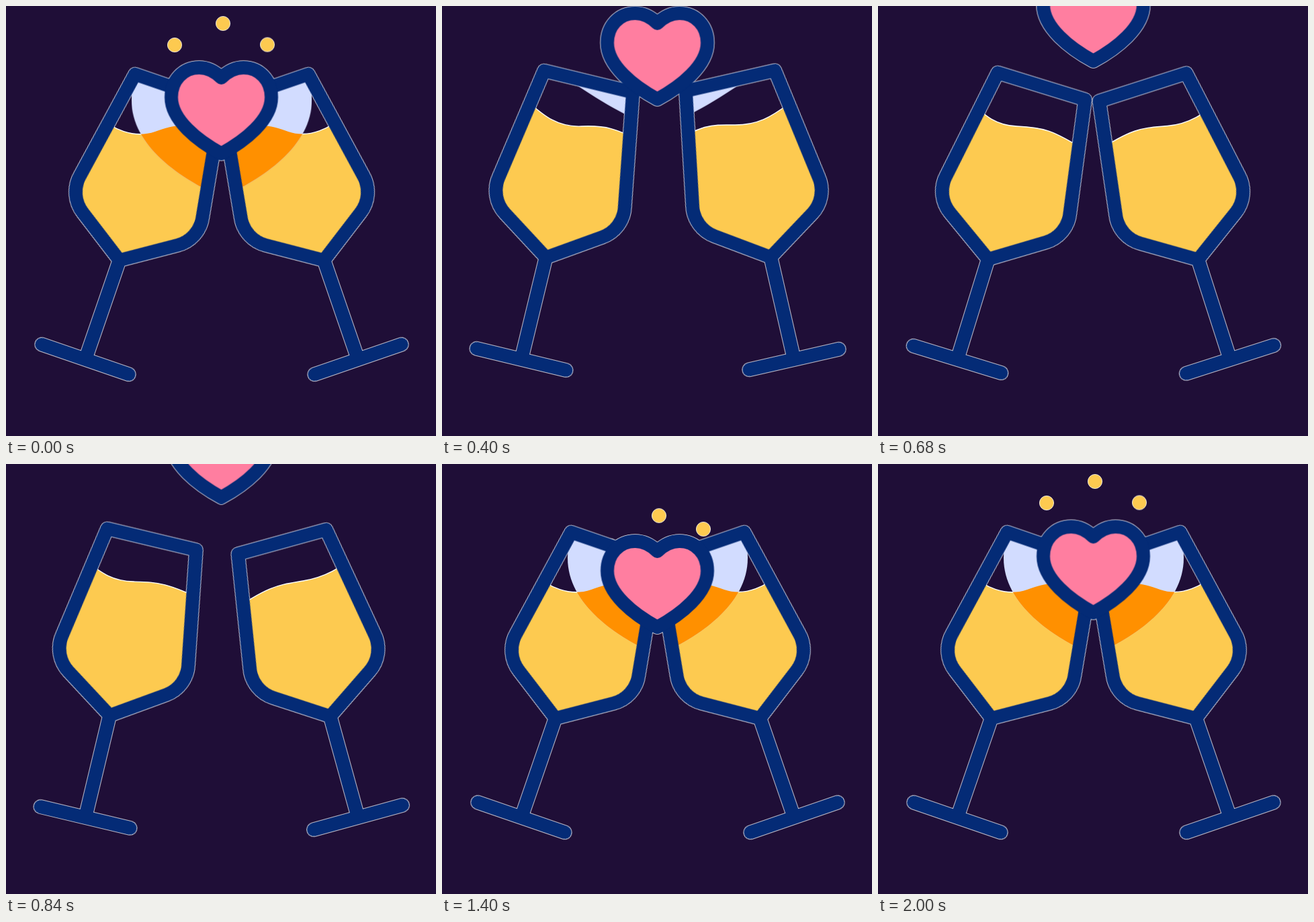
These frames come from a looping animation (640 px wide and 640 px high, 2.04 s). An HTML page without scripts:

```html
<!DOCTYPE html>
<html lang="en">
<head>
<meta charset="utf-8">
<title>Cheers</title>
<style>
  html, body { margin: 0; width: 100%; height: 100%; overflow: hidden; background: #1f0e37; }
  svg { display: block; width: 100%; height: 100%; }

  .tilt-l, .tilt-r, .wine-l, .wine-r, .splash, .rise, .grow, .dot {
    animation: 2040ms linear infinite;
  }
  .line { fill: none; stroke: #042b76; stroke-width: 20; stroke-linecap: round; stroke-linejoin: round; }
  .halo { fill: none; stroke: #fff; stroke-opacity: .9; stroke-width: 21.5; stroke-linecap: round; stroke-linejoin: round; }
  .wine { fill: #fdca50; stroke: #fff; stroke-width: 1.4; }
  .foam { fill: #d2dcff; }
  .glow { fill: #ff9000; }
  .heart { fill: #ff7ea0; stroke: #042b76; stroke-width: 20; stroke-linejoin: round; }

  /* glasses swing about the centre of the foot */
  .tilt-l { animation-name: tilt-l; }
  .tilt-r { animation-name: tilt-r; }
  @keyframes tilt-l {
    0%, 29.412%, 50.98%, 100% { transform: translate(118px, 526px) rotate(19deg); }
    15.686% { transform: translate(118px, 526px) rotate(11.4deg); }
    41.176% { transform: translate(118px, 526px) rotate(13.4deg); }
  }
  @keyframes tilt-r {
    0%, 29.412%, 50.98%, 100% { transform: translate(118px, 526px) rotate(19deg); }
    15.686% { transform: translate(118px, 526px) rotate(10.4deg); }
    41.176% { transform: translate(118px, 526px) rotate(15.4deg); }
  }

  /* sloshing surface */
  .wine-l { animation-name: wine-l; }
  .wine-r { animation-name: wine-r; }
  @keyframes wine-l {
    0%, 64.706%, 100% { d: path("M130 160C160 184 190 198 222 187S265 174 310 190L400 420L20 420Z"); }
    11.765% { d: path("M110 150C140 174 165 181 195 176S240 172 290 186L400 420L20 420Z"); }
    27.451% { d: path("M140 130C165 155 180 180 220 182S275 190 320 225L400 420L20 420Z"); }
    41.176% { d: path("M110 138C140 160 155 174 190 175S240 176 300 206L400 420L20 420Z"); }
    50.98%  { d: path("M140 140C168 168 185 186 215 185S270 180 320 208L400 420L20 420Z"); }
  }
  @keyframes wine-r {
    0%, 64.706%, 100% { d: path("M130 158C160 182 190 198 222 187S265 174 310 190L400 420L20 420Z"); }
    11.765% { d: path("M110 148C140 168 160 174 195 172S240 172 290 204L400 420L20 420Z"); }
    27.451% { d: path("M140 142C165 163 185 181 220 182S270 180 320 212L400 420L20 420Z"); }
    41.176% { d: path("M120 136C145 154 165 168 200 174S250 180 310 222L400 420L20 420Z"); }
    50.98%  { d: path("M140 138C168 166 185 184 215 183S270 180 320 210L400 420L20 420Z"); }
  }

  .splash { animation-name: splash; }
  @keyframes splash {
    0%, 64.706%, 100% { transform: translate(321px, 285px) scale(1); }
    27.451% { transform: translate(321px, 145px) scale(2.28); }
    27.46%, 49.02% { transform: translate(321px, 183px) scale(0); }
  }

  /* one heart leaves while the next grows in */
  .rise { animation-name: rise; }
  @keyframes rise {
    0% { transform: translate(320.5px, 155px); }
    56.863%, 100% { transform: translate(320.5px, -80px); }
  }
  .grow { animation-name: grow; }
  @keyframes grow {
    0%, 49.02% { transform: translate(320.5px, 192.4px) scale(0); }
    64.706% { transform: translate(320.5px, 180.9px) scale(1); }
    100% { transform: translate(320.5px, 155px) scale(1); }
  }

  .dot { fill: #fdca50; stroke: #fff; stroke-width: .8; animation-name: dot; }
  @keyframes dot {
    0%, 98.039%, 100% { transform: translate(var(--x), var(--end)) scale(1); }
    11.765% { transform: translate(var(--x), var(--end)) scale(var(--fade)); }
    27.451% { transform: translate(var(--x), var(--end)) scale(0); }
    60.784% { transform: translate(var(--x), var(--start)) scale(0); }
    68.627% {
      transform: translate(var(--x), var(--mid)) scale(1);
      animation-timing-function: cubic-bezier(.25, .4, .6, 1);
    }
  }
</style>
</head>
<body>
<svg viewBox="0 0 640 640">
  <defs>
    <path id="glass" d="M-68-425.5H68L96.4-255.4A50 50 0 0 1 74.7-205.5L0-156L-74.7-205.5A50 50 0 0 1-96.4-255.4ZM0-156V0M-68.5 0H68.5"/>
    <path id="heart" d="M0-48C-10-58-22-63-33-63C-57-63-74.5-44-74.5-19C-74.5 15-35 46 0 65C35 46 74.5 15 74.5-19C74.5-44 57-63 33-63C22-63 10-58 0-48Z"/>
    <path id="splash" d="M0 0C-60-27-134-75-134-145C-134-195-105-229-60-229H60C105-229 134-195 134-145C134-75 60-27 0 0Z"/>
    <clipPath id="bowl-l">
      <path class="tilt-l" d="M-68-425.5H68L96.4-255.4A50 50 0 0 1 74.7-205.5L0-156L-74.7-205.5A50 50 0 0 1-96.4-255.4Z"/>
    </clipPath>
    <clipPath id="bowl-r">
      <path class="tilt-r" d="M-68-425.5H68L96.4-255.4A50 50 0 0 1 74.7-205.5L0-156L-74.7-205.5A50 50 0 0 1-96.4-255.4Z"/>
    </clipPath>
    <clipPath id="pool-l"><path class="wine-l" d="M130 160C160 184 190 198 222 187S265 174 310 190L400 420L20 420Z"/></clipPath>
    <clipPath id="pool-r"><path class="wine-r" d="M130 158C160 182 190 198 222 187S265 174 310 190L400 420L20 420Z"/></clipPath>
  </defs>

  <rect width="640" height="640" fill="#1f0e37"/>

  <circle class="dot" r="10.6" style="--x:251px; --start:140px; --mid:122px; --end:58px; --fade:.9"/>
  <circle class="dot" r="10.6" style="--x:323px; --start:125px; --mid:77px; --end:26px; --fade:.58"/>
  <circle class="dot" r="10.6" style="--x:389px; --start:130px; --mid:97px; --end:57.5px; --fade:.5"/>

  <!-- pale rims under everything -->
  <g class="halo">
    <g class="tilt-l"><use href="#glass"/></g>
    <g transform="matrix(-1 0 0 1 642 0)"><g class="tilt-r"><use href="#glass"/></g></g>
    <g class="rise"><use href="#heart"/></g>
    <g class="grow"><use href="#heart"/></g>
  </g>

  <g>
    <g clip-path="url(#bowl-l)">
      <path class="wine wine-l" d="M130 160C160 184 190 198 222 187S265 174 310 190L400 420L20 420Z"/>
      <g class="foam splash"><use href="#splash"/></g>
      <g clip-path="url(#pool-l)"><g class="glow splash"><use href="#splash"/></g></g>
    </g>
    <g class="line tilt-l"><use href="#glass"/></g>
  </g>

  <g transform="matrix(-1 0 0 1 642 0)">
    <g clip-path="url(#bowl-r)">
      <path class="wine wine-r" d="M130 158C160 182 190 198 222 187S265 174 310 190L400 420L20 420Z"/>
      <g class="foam splash"><use href="#splash"/></g>
      <g clip-path="url(#pool-r)"><g class="glow splash"><use href="#splash"/></g></g>
    </g>
    <g class="line tilt-r"><use href="#glass"/></g>
  </g>

  <g class="heart rise"><use href="#heart"/></g>
  <g class="heart grow"><use href="#heart"/></g>
</svg>
</body>
</html>
```
